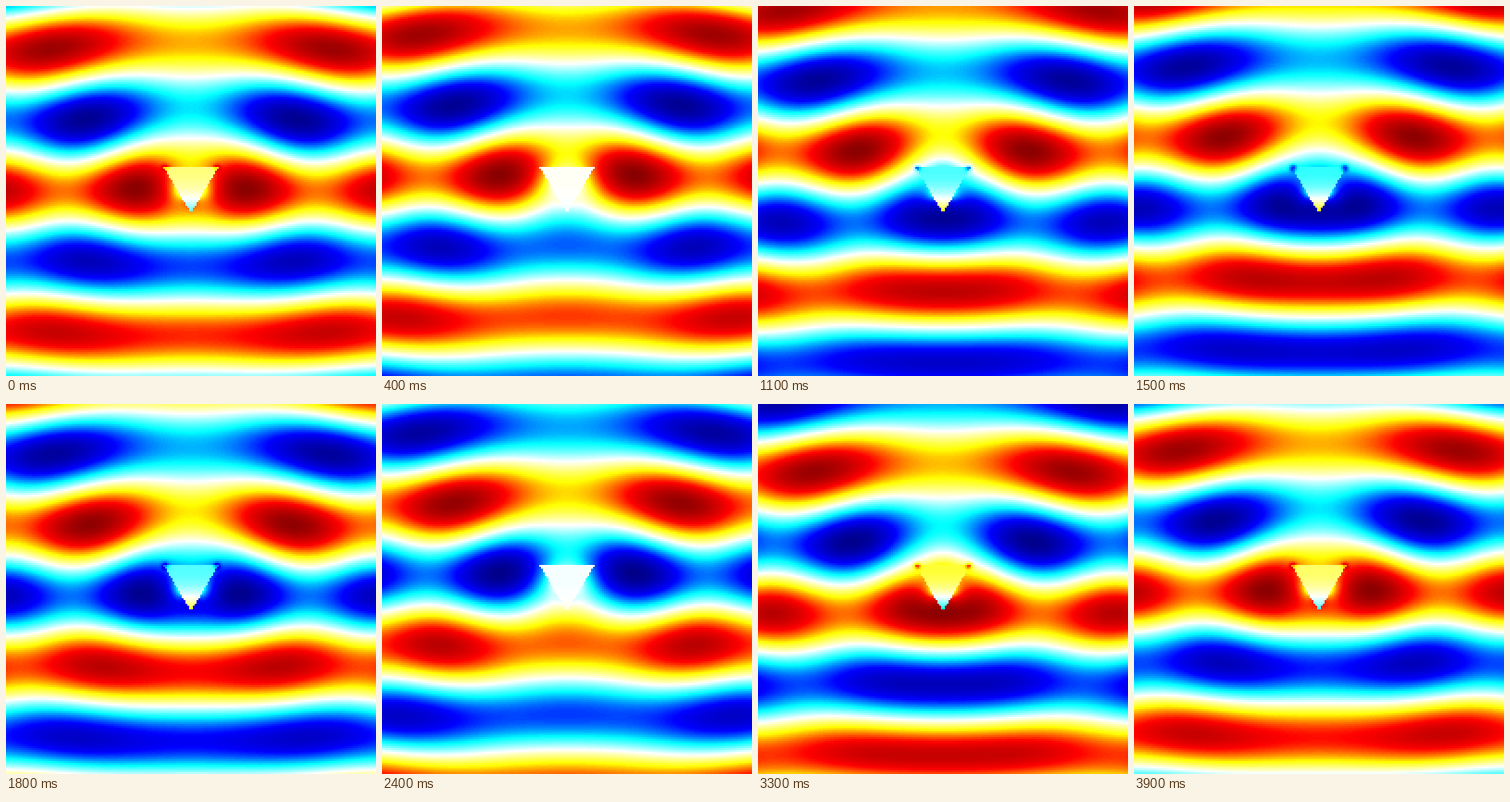
A matplotlib script for the animation above (4 s loop, 400x400 px).

```python
import numpy as np
import matplotlib.pyplot as plt
from matplotlib.animation import FuncAnimation
from matplotlib.colors import LinearSegmentedColormap

SIZE = 400
CELL = 2
FRAMES = 40
K = 2 * np.pi / 153          # wavenumber per pixel
AMP = 0.7                    # incident amplitude
MULTIPOLES = (-0.20 - 0.85j, -0.27 - 0.36j, -0.08 - 0.05j)
TOP, APEX, HALF = 174, 224, 30


def hankel_table(zmin=0.3, zmax=13, count=1500, nodes=2000):
    """Outgoing Hankel functions of order 0, 1 and 2 from integrals."""
    z = np.linspace(zmin, zmax, count)
    th = (np.arange(nodes) + 0.5) * np.pi / 2 / nodes
    wave = np.cos(z[:, None] * np.cos(th))
    logs = np.euler_gamma + np.log(2 * z[:, None] * np.sin(th) ** 2)
    j0 = wave.mean(axis=1)
    y0 = 2 / np.pi * (wave * logs).mean(axis=1)
    h0 = j0 + 1j * y0
    h1 = -np.gradient(h0, z, edge_order=2)
    return z, (h0, h1, 2 * h1 / z - h0)


def scattered(x, up):
    r = np.hypot(x, up)
    angle = np.arctan2(x, up)
    kr = np.maximum(K * r, 0.5)
    z, orders = hankel_table()
    total = 0
    for n, (c, h) in enumerate(zip(MULTIPOLES, orders)):
        hn = np.interp(kr, z, h.real) + 1j * np.interp(kr, z, h.imag)
        total = total + c * 1j ** n * hn * np.cos(n * angle)
    return total


def build_field():
    axis = (np.arange(SIZE // CELL) + 0.5) * CELL
    px, py = np.meshgrid(axis, axis)
    x, up = px - SIZE / 2, SIZE / 2 - py
    field = AMP * (np.exp(1j * K * up) + scattered(x, up))

    # Weak field within the triangle, reversing sign towards the apex
    depth = np.clip((py - TOP) / (APEX - TOP), 0, 1)
    inner = (0.27 - 0.7 * depth ** 2.5) * np.exp(-1j * np.radians(51))
    inside = (py > TOP) & (py < APEX) & (np.abs(x) < HALF * (1 - depth))
    field = np.where(inside, inner, field)

    # Hot spots at the two upper corners
    d2 = (np.abs(x) - HALF + 2) ** 2 + (py - TOP - 1) ** 2
    return field + 0.35 * np.exp(-1j * np.radians(54)) * np.exp(-d2 / 14)


field = build_field()
cmap = LinearSegmentedColormap.from_list(
    "wave",
    [(0, 0, 0.5), (0, 0, 1), (0, 1, 1), (1, 1, 1),
     (1, 1, 0), (1, 0, 0), (0.5, 0, 0)],
    N=256,
)

fig = plt.figure(figsize=(4, 4), dpi=100)
ax = fig.add_axes([0, 0, 1, 1])
ax.axis("off")
image = ax.imshow(field.real, cmap=cmap, vmin=-1, vmax=1,
                  interpolation="nearest", aspect="auto")


def update(i):
    phase = 2 * np.pi * i / FRAMES
    image.set_data((field * np.exp(-1j * phase)).real)
    return [image]


anim = FuncAnimation(fig, update, frames=FRAMES, interval=100,
                     repeat=True, repeat_delay=0)
plt.show()
```
